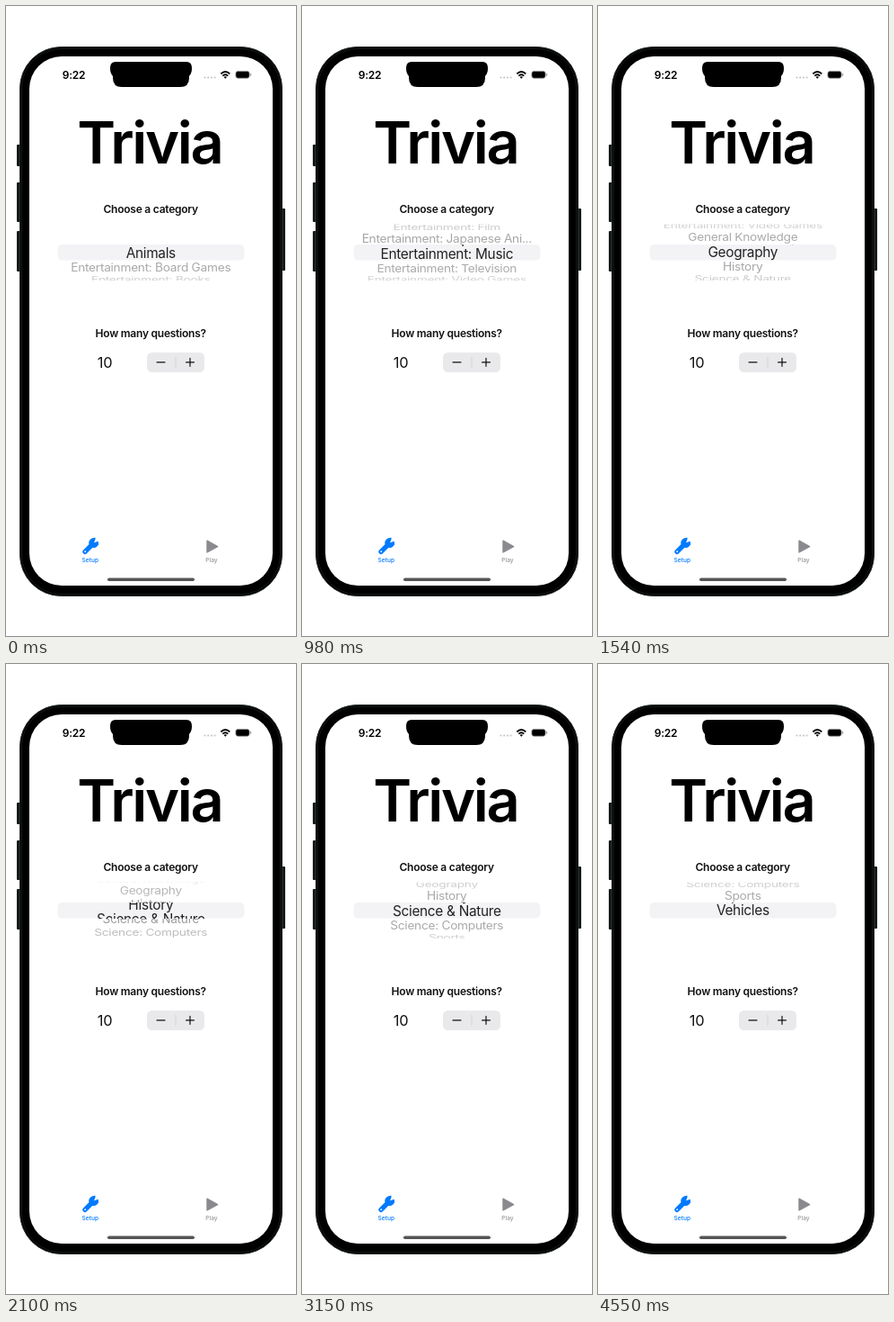
Recreate the animation shown at these times as an HTML page. Size 323 by 700 pixels, loop 5240 ms.

```html
<!DOCTYPE html>
<html lang="en">
<head>
<meta charset="utf-8">
<title>Trivia setup</title>
<style>
  html, body { margin: 0; width: 100%; height: 100%; overflow: hidden; background: #fff; }
  svg { display: block; width: 323px; height: 700px; }
  text { font-family: Inter, "Liberation Sans", sans-serif; text-anchor: middle; fill: #000; }
  .title { font-size: 65px; font-weight: 600; letter-spacing: -.035em; }
  .label { font-size: 12px; font-weight: 600; letter-spacing: -.02em; fill: #111; }
  .clock { font-size: 12px; font-weight: 600; letter-spacing: -.02em; }
  .count { font-size: 16.4px; letter-spacing: -.02em; fill: #111; }
  .tab { font-size: 6.6px; font-weight: 500; }
  .row { font-size: 15.4px; letter-spacing: -.02em; fill: #222; }
</style>
</head>
<body>
<svg viewBox="0 0 323 700">
  <defs>
    <clipPath id="band"><rect x="57" y="265" width="208" height="18"/></clipPath>
    <clipPath id="rim"><path d="M57 242.5h208V265H57zM57 283h208v22H57z"/></clipPath>
  </defs>

  <g fill="#171b1b">
    <rect x="12" y="154" width="6" height="24" rx="1"/>
    <rect x="12" y="196" width="6" height="44" rx="1"/>
    <rect x="12" y="250" width="6" height="45" rx="1"/>
    <rect x="304" y="225" width="7" height="69" rx="1"/>
  </g>
  <rect x="15.5" y="45.5" width="292" height="610" rx="46" fill="#000" stroke="#262c2c"/>
  <rect x="17.5" y="47.5" width="288" height="606" rx="44" fill="none" stroke="#151919"/>
  <rect x="26" y="56" width="271" height="588" rx="36" fill="#fff"/>
  <path d="M122 62H201Q207 62 207 69Q207 75 204 78V80Q204 90 194 90H129Q119 90 119 80V78Q116 75 116 69Q116 62 122 62Z"/>

  <text class="clock" x="75.5" y="80.6">9:22</text>
  <g fill="#c4c4c6">
    <circle cx="221.5" cy="79.5" r="1.1"/><circle cx="225.2" cy="79.5" r="1.1"/>
    <circle cx="228.9" cy="79.5" r="1.1"/><circle cx="232.6" cy="79.5" r="1.1"/>
  </g>
  <g fill="none" stroke="#000" stroke-width="1.8">
    <path d="M239.3 75.4Q244.3 70.6 249.3 75.4M241.3 77.6Q244.3 74.8 247.3 77.6"/>
  </g>
  <path d="M242.6 79Q244.3 77.6 246 79L244.3 80.8Z"/>
  <rect x="255.9" y="72.4" width="15.2" height="7.8" rx="2.4" fill="#000" stroke="#999" stroke-width=".7"/>
  <rect x="272" y="74.8" width="1.1" height="3" rx=".5" fill="#999"/>

  <text class="title" x="160" y="175">Trivia</text>
  <text class="label" x="161.2" y="229.8">Choose a category</text>

  <rect x="57.5" y="265" width="208" height="17.6" rx="5" fill="#f3f3f6"/>
  <g id="outer" clip-path="url(#rim)"></g>
  <g id="inner" clip-path="url(#band)"></g>

  <text class="label" x="161.2" y="368.3">How many questions?</text>
  <text class="count" x="110" y="401.5">10</text>
  <rect x="157" y="385" width="64" height="22" rx="5.5" fill="#e9e9ec"/>
  <path d="M189 390V402" stroke="#d0d0d4" stroke-width=".8"/>
  <path d="M168 395.8H177M200.5 395.8H209.5M205 391.3V400.3" stroke="#111" stroke-width="1.2" stroke-linecap="round"/>

  <g fill="#007aff">
    <path d="M88 606.3L96.5 597.8" stroke="#007aff" stroke-width="5.4" stroke-linecap="round"/>
    <circle cx="97.6" cy="596.6" r="5.4"/>
    <path d="M98 596.2L100.6 589.8L105 594Z" fill="#fff"/>
    <path d="M95.4 591.8L99.6 590.6L98 595.4ZM102.8 595.4L103.2 599L98.6 597.2Z"/>
    <circle cx="88.2" cy="606.2" r=".9" fill="#fff"/>
  </g>
  <text class="tab" x="93.8" y="618.4" style="fill:#007aff">Setup</text>
  <path d="M224 594.2L235.6 600.6L224 607Z" fill="#8a8a8e" stroke="#8a8a8e" stroke-width="1.4" stroke-linejoin="round"/>
  <text class="tab" x="228.9" y="618.4" style="fill:#97979b">Play</text>
  <rect x="113" y="635.4" width="97" height="3.6" rx="1.8" fill="#555"/>
</svg>

<script>
const LOOP = 5240, STEP = 70;
const MID = { x: 161.3, y: 274 };
const wheel = { radius: 38.6, angle: 25 * Math.PI / 180, scale: .89, flat: 16.7 };

const fun = name => 'Entertainment: ' + name;
const names = [
  'Animals',
  ...['Board Games', 'Books', 'Cartoon &...', 'Comics', 'Film', 'Japanese Ani...',
    'Music', 'Television', 'Video Games'].map(fun),
  'General Knowledge', 'Geography', 'History', 'Science & Nature',
  'Science: Computers', 'Sports', 'Vehicles'
];

function addRow(id, name) {
  const el = document.createElementNS('http://www.w3.org/2000/svg', 'text');
  el.setAttribute('class', 'row');
  el.setAttribute('y', 5.5);
  el.textContent = name;
  return document.getElementById(id).appendChild(el);
}
const rows = names.map(name => ({ outer: addRow('outer', name), inner: addRow('inner', name) }));

// Wheel position in rows: a long flick, then a pull past the end and a spring back.
function position(t) {
  if (t < 598) return 0;
  if (t < 3150) return Math.min(13, 13.1 * (1 - Math.exp((598 - t) / 508)));
  if (t < 4010) {
    const u = Math.min(1, (t - 3150) / 800);
    return 13 + 3.35 * (1 - (1 - u) ** 3);
  }
  const k = (t - 4010) / 90;
  return 16 + .35 * (1 + k) * Math.exp(-k);
}

function place(el, y, sx, sy) {
  el.setAttribute('transform', `translate(${MID.x} ${MID.y + y}) scale(${sx} ${sy})`);
}

function render(t) {
  const pos = position(t);
  rows.forEach(({ outer, inner }, i) => {
    const d = i - pos, a = d * wheel.angle, c = Math.cos(a);
    const seen = Math.abs(d) < 3.2;
    outer.style.display = seen ? '' : 'none';
    inner.style.display = Math.abs(d) < 1.6 ? '' : 'none';
    if (!seen) return;
    place(outer, wheel.radius * Math.sin(a), wheel.scale, wheel.scale * c);
    outer.style.opacity = .46 * c ** 1.7;
    place(inner, d * wheel.flat, 1, 1);
  });
}

const start = performance.now();
function frame() {
  const t = (performance.now() - start) % LOOP;
  render(Math.floor(t / STEP) * STEP);
  requestAnimationFrame(frame);
}
render(0);
requestAnimationFrame(frame);
</script>
</body>
</html>
```
